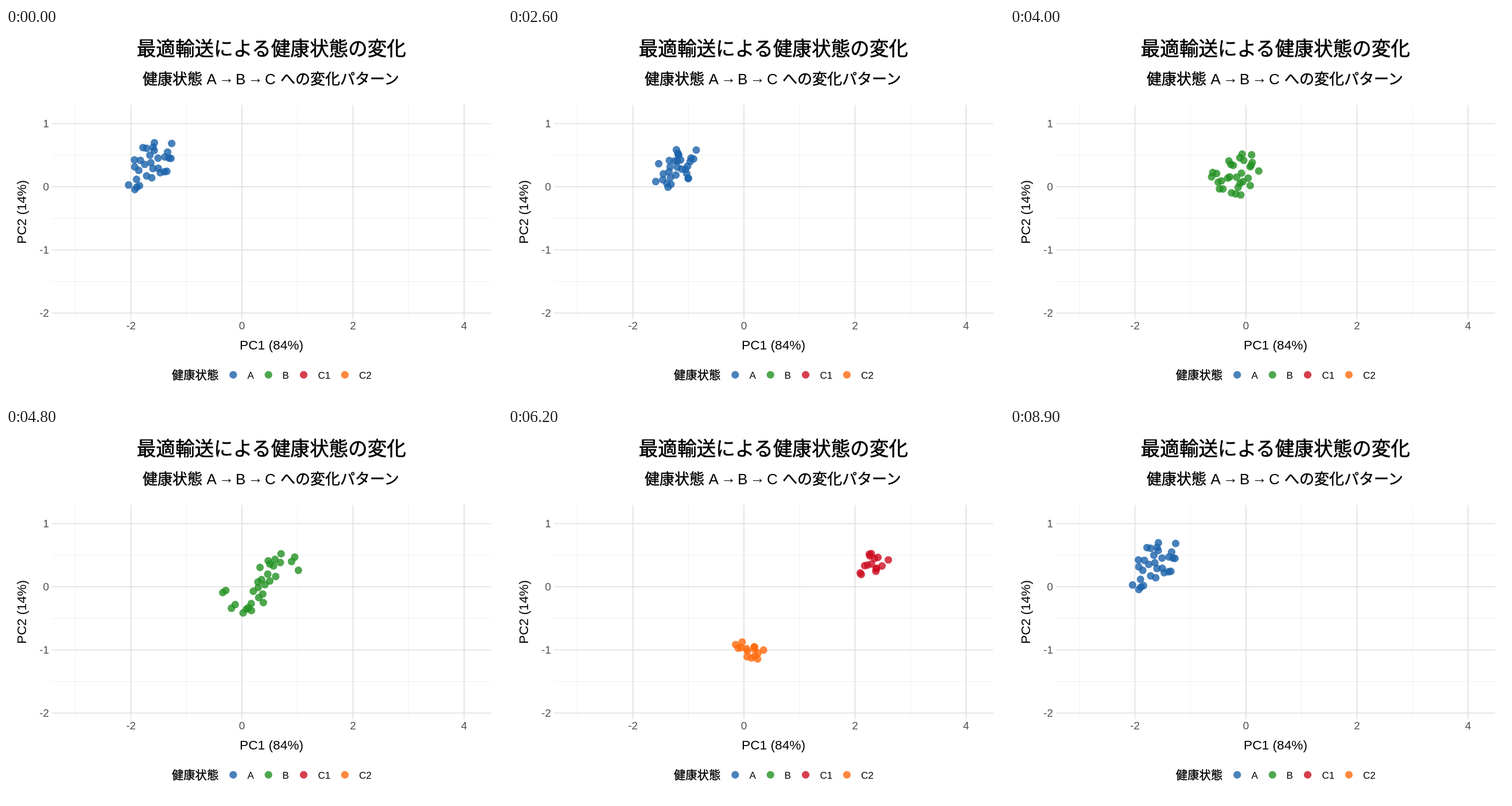
Animation, 864 px wide and 648 px high, one loop 9000 ms. Source, as an HTML page:

```html
<!DOCTYPE html>
<html lang="ja">
<head>
<meta charset="utf-8">
<title>最適輸送による健康状態の変化</title>
<style>
  html, body { margin: 0; width: 100%; height: 100%; overflow: hidden; background: #fff; }
  svg { display: block; width: 864px; height: 648px; }
  text { font-family: "Liberation Sans", Arial, sans-serif; fill: #000; }
  .jp { font-family: "Noto Sans CJK JP", "Noto Sans CJK", sans-serif; stroke: #000; stroke-width: .018em; }
  .tick { font-size: 18.8px; fill: #4d4d4d; }
  .axis { font-size: 22.7px; text-anchor: middle; }
  .title { font-size: 33.6px; text-anchor: middle; }
  .sub { font-size: 26px; }
  .arrow { font-size: 26px; text-anchor: middle; }
  .legend { font-size: 17px; }
  .minor { stroke: #f0f0f0; stroke-width: 1; }
  .major { stroke: #dedede; stroke-width: 1.6; }
  circle { fill-opacity: .8; }
</style>
</head>
<body>
<svg id="stage" viewBox="0 0 864 648"></svg>
<script>
const stage = document.getElementById('stage');
const COLORS = { A: '#1a62aa', B: '#229122', C1: '#cc0f22', C2: '#ff6a0d' };
const PANEL = { left: 80, right: 845, top: 134, bottom: 507 };
const LOOP = 9000, LEAVE = 2000, MIDDLE = 4400, ARRIVE = 6800, RESET = 8900;
const COUNT = 30, HALF = COUNT / 2;

const px = v => 411 + v * 96.75;
const py = v => 276.5 - v * 110;

function add(tag, attrs, text) {
  const el = document.createElementNS('http://www.w3.org/2000/svg', tag);
  for (const name in attrs) el.setAttribute(name, attrs[name]);
  if (text) el.textContent = text;
  return stage.appendChild(el);
}
const label = (cls, x, y, text, more) => add('text', { class: cls, x, y, ...more }, text);
const dot = (cx, cy, fill) => add('circle', { cx, cy, r: 6.6, fill });
const vline = (cls, v) => add('line', { class: cls, x1: px(v), x2: px(v), y1: PANEL.top, y2: PANEL.bottom });
const hline = (cls, v) => add('line', { class: cls, x1: PANEL.left, x2: PANEL.right, y1: py(v), y2: py(v) });

function seeded(seed) {
  return () => {
    seed = (seed + 0x6d2b79f5) | 0;
    let t = Math.imul(seed ^ (seed >>> 15), 1 | seed);
    t = (t + Math.imul(t ^ (t >>> 7), 61 | t)) ^ t;
    return ((t ^ (t >>> 14)) >>> 0) / 4294967296;
  };
}

// An even, jittered disc stretched to the given centre, deviations and correlation.
// The stride shuffles the order, so that individuals mix between states.
function cloud(n, { x, y, sx, sy, corr, stride, seed }) {
  const random = seeded(seed);
  const phase = random() * 2 * Math.PI;
  return Array.from({ length: n }, (_, i) => {
    const rank = (i * stride) % n;
    const r = 2 * Math.sqrt((rank + 0.2 + 0.6 * random()) / n);
    const angle = phase + rank * 2.4 + random();
    const u = r * Math.cos(angle), v = r * Math.sin(angle);
    return [x + sx * u, y + sy * (corr * u + Math.sqrt(1 - corr * corr) * v)];
  });
}

const stateA = cloud(COUNT, { x: 251.3, y: 238.7, sx: 20.5, sy: 24, corr: -0.48, stride: 7, seed: 3 });
const stateB = cloud(COUNT, { x: 421, y: 259.5, sx: 27, sy: 22, corr: -0.2, stride: 11, seed: 8 });
const stateC = [
  ...cloud(HALF, { x: 704.2, y: 232.4, sx: 15.4, sy: 12, corr: -0.1, stride: 7, seed: 5 }),
  ...cloud(HALF, { x: 422.5, y: 426.2, sx: 12, sy: 14, corr: 0.1, stride: 4, seed: 12 })
];

function drawChart() {
  [-3, -1, 1, 3].forEach(v => vline('minor', v));
  [0.5, -0.5, -1.5].forEach(v => hline('minor', v));
  [-2, 0, 2, 4].forEach(v => {
    vline('major', v);
    label('tick', px(v), 525, String(v), { 'text-anchor': 'middle' });
  });
  [1, 0, -1, -2].forEach(v => {
    hline('major', v);
    label('tick', 75, py(v) + 6.7, String(v), { 'text-anchor': 'end' });
  });

  label('axis', 462.5, 560, 'PC1 (84%)');
  label('axis', 0, 0, 'PC2 (14%)', { transform: 'translate(35 320.5) rotate(-90)' });

  label('jp title', 462.3, 47.5, '最適輸送による健康状態の変化');
  label('jp sub', 238, 98.3, '健康状態');
  label('sub', 349.5, 98.3, 'A');
  label('arrow', 384.2, 96, '→');
  label('sub', 400, 98.3, 'B');
  label('arrow', 434.7, 96, '→');
  label('sub', 451, 98.3, 'C');
  label('jp sub', 478, 98.3, 'への変化パターン');

  label('jp', 288.8, 611.5, '健康状態', { 'font-size': 20.4 });
  [['A', 395.8, 420.5], ['B', 457.2, 481.5], ['C1', 518.5, 543.5], ['C2', 590.3, 615]]
    .forEach(([name, x, textX]) => {
      dot(x, 604.2, COLORS[name]);
      label('legend', textX, 610.5, name);
    });
}

function drawPoint(a, i) {
  const b = stateB[i], c = stateC[i];
  const end = i < HALF ? COLORS.C1 : COLORS.C2;
  const point = dot(a[0], a[1], COLORS.A);
  // The tiny lead keeps rounding from delaying a step.
  const timing = { duration: LOOP, iterations: Infinity, delay: -0.5 };
  const at = (ms, [x, y], easing = 'linear') =>
    ({ offset: ms / LOOP, cx: x + 'px', cy: y + 'px', easing });
  const tint = (ms, fill) => ({ offset: ms / LOOP, fill, easing: 'steps(1)' });

  point.animate([
    at(0, a), at(LEAVE, a, 'steps(24)'), at(MIDDLE, b, 'steps(24)'),
    at(ARRIVE, c), at(RESET, c), at(RESET, a), at(LOOP, a)
  ], timing);
  point.animate([
    tint(0, COLORS.A), tint((LEAVE + MIDDLE) / 2, COLORS.B),
    tint((MIDDLE + ARRIVE) / 2, end), tint(RESET, COLORS.A), tint(LOOP, COLORS.A)
  ], timing);
}

drawChart();
stateA.forEach(drawPoint);
</script>
</body>
</html>
```
